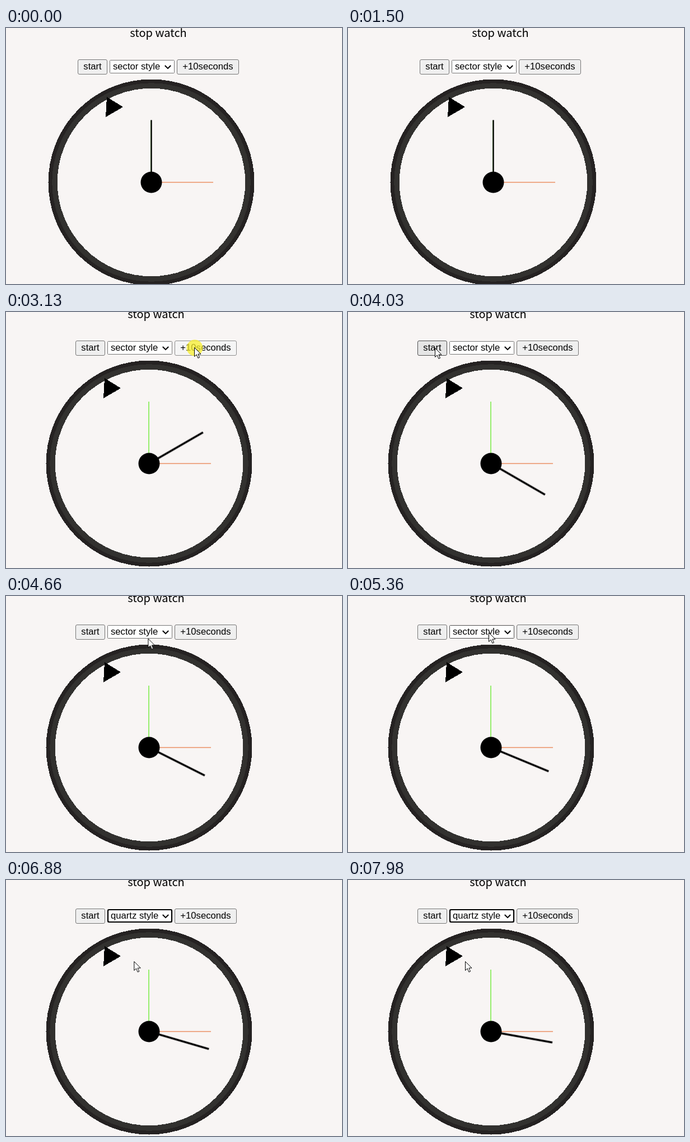
An HTML page for the animation above (8000 ms loop, 600 by 457 pixels).

```html
<!DOCTYPE html>
<html lang="en">
<head>
<meta charset="utf-8">
<title>stop watch</title>
<style>
html, body { margin: 0; height: 100%; overflow: hidden; background: #f8f5f4; }
svg { display: block; width: 600px; height: 457px; }
text { font: 16.67px "Liberation Sans", Arial, sans-serif; }
.title { font: 20px "Noto Sans CJK JP", "Noto Sans", sans-serif; }
.mid { text-anchor: middle; }
.button { fill: #efefef; stroke: #767676; }
.crisp { shape-rendering: crispEdges; }

/* One 8 s loop; 1% is 80 ms. Holds by default, glides where stated. */
.anim { animation: 8s step-end infinite; }
.page { animation-name: scroll; }
.hand { animation-name: hand; transform-origin: 255.5px 270.5px; }
.cursor { animation-name: cursor; }
.click { animation-name: click; }
.start { animation-name: start; }
.plus { animation-name: plus; }
.select { animation-name: select; }
.menu { animation-name: menu; filter: drop-shadow(0 3px 4px rgba(0, 0, 0, .4)); }
.marker { animation-name: marker; }
.row-a { animation-name: row-a; }
.row-b { animation-name: row-b; }
.before { animation-name: before; }
.after { animation-name: after; }

@keyframes scroll {
  0% { transform: translate(4px, 5px); }
  21.5%, 100% { transform: none; }
}
@keyframes hand {
  0% { transform: rotate(0deg); stroke-width: 2.4px; }
  34.2% { transform: rotate(60deg); stroke-width: 3.5px; }
  39.95% { transform: rotate(120deg); stroke-width: 3.5px; }
  51.3% { transform: rotate(120deg); stroke-width: 3.5px; animation-timing-function: linear; }
  79.9% { transform: rotate(106.3deg); stroke-width: 3.5px; }
  91.1% { transform: rotate(104.3deg); stroke-width: 3.5px; animation-timing-function: linear; }
  100% { transform: rotate(100deg); stroke-width: 3.5px; }
}
@keyframes cursor {
  0% { transform: translate(700px, 520px); }
  .87% { transform: translate(442px, 307px); animation-timing-function: linear; }
  2.5%, 5% { transform: translate(350px, 66px); animation-timing-function: linear; }
  7.5% { transform: translate(420px, 435px); animation-timing-function: linear; }
  12%, 15.4% { transform: translate(304px, -7px); animation-timing-function: linear; }
  18.7% { transform: translate(304px, -24px); animation-timing-function: linear; }
  27.2% { transform: translate(312px, -22px); animation-timing-function: linear; }
  29%, 40.5% { transform: translate(336px, 63px); animation-timing-function: ease-in-out; }
  48.5%, 52.5% { transform: translate(155px, 64px); animation-timing-function: ease-in-out; }
  59% { transform: translate(256px, 76px); animation-timing-function: linear; }
  66%, 67.2% { transform: translate(251px, 65px); animation-timing-function: linear; }
  69.5%, 71.6% { transform: translate(241px, 66px); animation-timing-function: ease-in-out; }
  76%, 83% { transform: translate(240px, 115px); animation-timing-function: ease-in-out; }
  87.7%, 91.1% { transform: translate(224px, 156px); animation-timing-function: ease-out; }
  94.5%, 100% { transform: translate(209px, 145px); }
}
@keyframes click {
  0%, 34.2%, 39.95%, 52.1%, 71.2%, 82.6%, 100% { opacity: 0; }
  33.3%, 39.1%, 51.2%, 70.3%, 81.7% { opacity: 1; }
}
@keyframes start {
  0%, 53.8%, 100% { fill: #efefef; stroke: #767676; }
  47%, 52.1% { fill: #e5e5e5; stroke: #4f4f4f; }
  51.2% { fill: #f5f5f5; stroke: #8d8d8d; }
}
@keyframes plus {
  0%, 5.2%, 42.5%, 100% { fill: #efefef; stroke: #767676; }
  2.4%, 28.9%, 34.2%, 39.95% { fill: #e5e5e5; stroke: #4f4f4f; }
  33.3%, 39.1% { fill: #f5f5f5; stroke: #8d8d8d; }
}
@keyframes select {
  0%, 100% { stroke: #767676; }
  60% { stroke: #4f4f4f; }
}
@keyframes menu {
  0%, 82.6%, 100% { opacity: 0; }
  71.2% { opacity: 1; }
}
@keyframes marker {
  0% { transform: translateY(-21px); }
  74.4%, 100% { transform: none; }
}
@keyframes row-a {
  0% { fill: #fff; }
  74.4%, 100% { fill: #000; }
}
@keyframes row-b {
  0% { fill: #000; }
  74.4%, 100% { fill: #fff; }
}
@keyframes before {
  0% { opacity: 1; }
  82.6%, 100% { opacity: 0; }
}
@keyframes after {
  0% { opacity: 0; }
  82.6%, 100% { opacity: 1; }
}
</style>
</head>
<body>
<svg viewBox="0 0 600 457">
  <g class="anim page">
    <text class="title mid" x="268" y="11">stop watch</text>

    <g fill="none" class="crisp">
      <circle cx="255.5" cy="270.5" r="180" stroke="#252222" stroke-width="8"/>
      <circle cx="255.5" cy="270.5" r="172.5" stroke="#32312f" stroke-width="9.5"/>
    </g>
    <path class="crisp" d="M176 118L205 136 174 154z"/>
    <path d="M255.5 270.5H366" stroke="#ea8f62" stroke-width="1.7"/>
    <path d="M255 270.5V160" stroke="#86ec55" stroke-width="1.7"/>
    <path class="anim hand" d="M255.5 270.5V159.3" stroke="#000"/>
    <circle cx="255.5" cy="270.5" r="19"/>

    <rect class="button anim start" x="124.5" y="51.5" width="52" height="26" rx="2.5"/>
    <text class="mid" x="150.5" y="69">start</text>
    <rect class="button anim plus" x="301.5" y="51.5" width="110" height="26" rx="2.5"/>
    <text class="mid" x="356.5" y="69">+10seconds</text>

    <rect class="anim select" x="181.5" y="52.5" width="115" height="23" rx="1" fill="#fff"/>
    <rect class="anim after" x="182" y="53" width="114" height="22" rx="2.5" fill="#fff" stroke="#000" stroke-width="2.2"/>
    <text class="anim before" x="187" y="69">sector style</text>
    <text class="anim after" x="187" y="69">quartz style</text>
    <path d="M279.8 62l5.2 5.2 5.2-5.2" fill="none" stroke="#000" stroke-width="2"/>

    <g class="anim menu">
      <rect x="181.5" y="76.5" width="114" height="44" fill="#fff" stroke="#8a8a8a"/>
      <rect class="anim marker" x="182" y="98" width="113" height="22" fill="#1e90ff"/>
      <text class="anim row-a" x="187" y="92">sector style</text>
      <text class="anim row-b" x="187" y="113">quartz style</text>
    </g>
  </g>

  <g class="anim cursor">
    <circle class="anim click" cx="1" cy="1" r="14.5" fill="#f7ee2c" fill-opacity=".75"/>
    <path d="M.5.5V16.5l3.7-3.5 2.7 6.3 2.6-1.1-2.6-6.1H12z" fill="#fff" stroke="#000"/>
  </g>
</svg>
</body>
</html>
```
